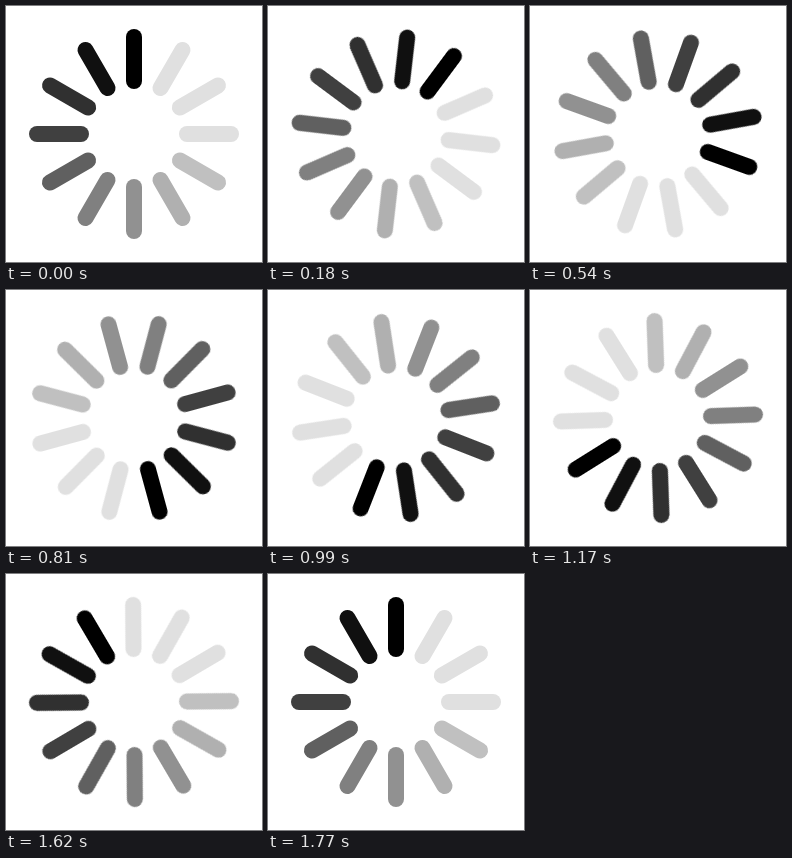
These frames come from a looping animation (256 by 256 pixels, 1800 ms). An HTML page:

```html
<!DOCTYPE html>
<html lang="en">
<head>
<meta charset="utf-8">
<title>Loading spinner</title>
<style>
  html, body {
    margin: 0;
    width: 100%;
    height: 100%;
    overflow: hidden;
    background: #fff;
  }

  svg {
    display: block;
    width: 100vw;
    height: 100vh;
  }

  /* 60 poses; the first and last coincide. The tiny delay keeps steps off exact boundaries. */
  .spinner {
    transform-origin: 0 0;
    animation: spin 1800ms steps(60, jump-none) -1ms infinite;
  }

  .spinner rect {
    fill: rgb(var(--v), var(--v), var(--v));
    transform-origin: 0 0;
    transform: rotate(calc(var(--i) * 30deg));
  }

  @keyframes spin {
    from { transform: rotate(0deg); }
    to { transform: rotate(360deg); }
  }
</style>
</head>
<body>
<svg viewBox="-128 -128 256 256">
  <defs>
    <rect id="bar" x="-8" y="-105" width="16" height="60" rx="8"/>
  </defs>
  <g class="spinner">
    <rect x="-8" y="-105" width="16" height="60" rx="8" style="--i:0; --v:0"/>
    <rect x="-8" y="-105" width="16" height="60" rx="8" style="--i:1; --v:224"/>
    <rect x="-8" y="-105" width="16" height="60" rx="8" style="--i:2; --v:224"/>
    <rect x="-8" y="-105" width="16" height="60" rx="8" style="--i:3; --v:224"/>
    <rect x="-8" y="-105" width="16" height="60" rx="8" style="--i:4; --v:192"/>
    <rect x="-8" y="-105" width="16" height="60" rx="8" style="--i:5; --v:176"/>
    <rect x="-8" y="-105" width="16" height="60" rx="8" style="--i:6; --v:145"/>
    <rect x="-8" y="-105" width="16" height="60" rx="8" style="--i:7; --v:128"/>
    <rect x="-8" y="-105" width="16" height="60" rx="8" style="--i:8; --v:96"/>
    <rect x="-8" y="-105" width="16" height="60" rx="8" style="--i:9; --v:64"/>
    <rect x="-8" y="-105" width="16" height="60" rx="8" style="--i:10; --v:48"/>
    <rect x="-8" y="-105" width="16" height="60" rx="8" style="--i:11; --v:16"/>
  </g>
</svg>
</body>
</html>
```
